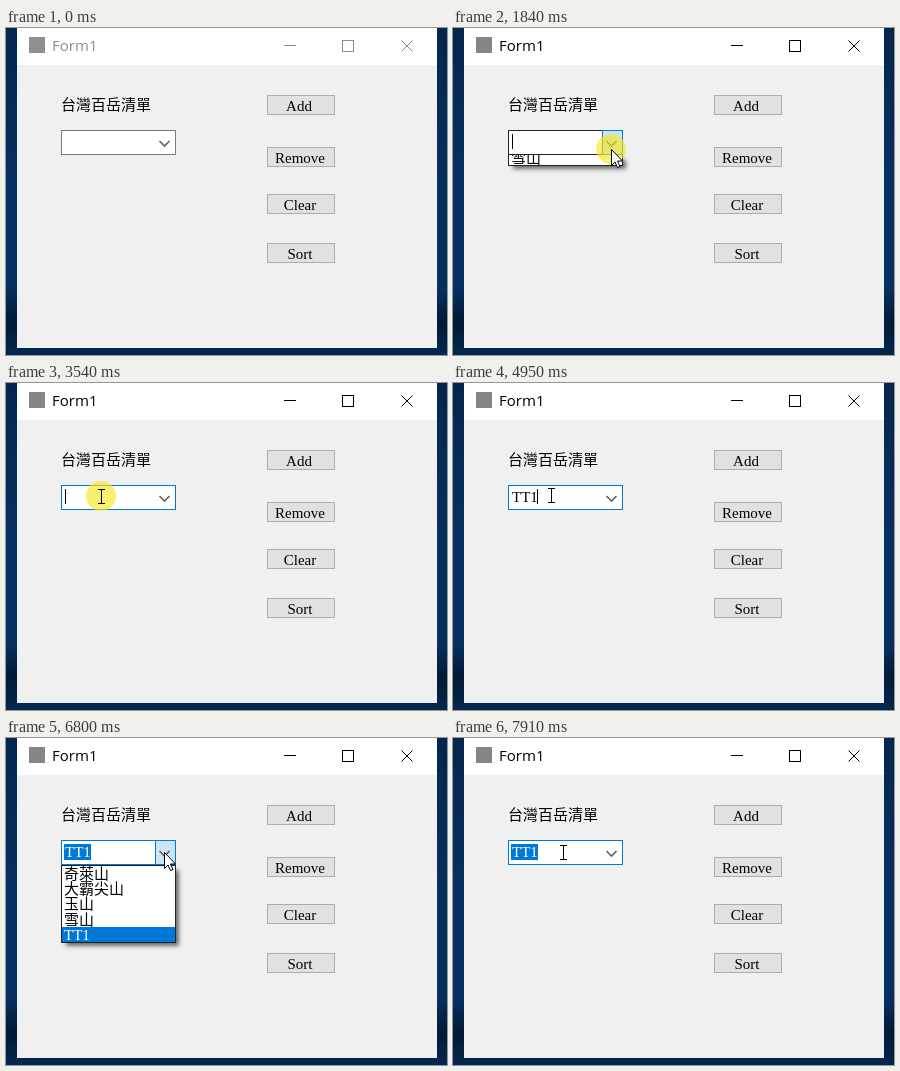
An HTML page with a canvas for the animation above (8 s loop, 441 by 327 pixels).

```html
<!DOCTYPE html>
<html lang="zh-Hant">
<head>
<meta charset="utf-8">
<title>Form1</title>
<style>
html, body { margin: 0; width: 100%; height: 100%; overflow: hidden; background: #04264c; }
canvas { display: block; }
</style>
</head>
<body>
<canvas id="stage" width="441" height="327"></canvas>
<script>
const ctx = document.getElementById('stage').getContext('2d');
const LOOP = 8000;
const BLUE = '#0078d7';
const SERIF = '15px "Liberation Serif", "Noto Sans CJK TC", "Noto Sans CJK", serif';
const CJK = '15px "Noto Sans CJK TC", "Noto Sans CJK", sans-serif';
const PEAKS = ['奇萊山', '大霸尖山', '玉山', '雪山'];
const ROW = 15.2, LIST_TOP = 127;
const COMBO = [55, 102, 115, 25];
const BUTTONS = [['Add', 67], ['Remove', 118.5], ['Clear', 166], ['Sort', 215]];

// Pointer path: time, x, y
const PATH = [
  [530, 260, 287], [1220, 134, 100], [1360, 134, 100], [1700, 158, 121],
  [2400, 158, 121], [2590, 169, 115], [2830, 247, 90], [3140, 157, 128],
  [3500, 95, 113], [3680, 98, 112], [4950, 98, 112], [5500, 285, 75],
  [5700, 284, 72], [6100, 284, 72], [6500, 158, 114], [6900, 158, 114],
  [7230, 125, 222], [7340, 125, 222], [7640, 116, 113], [7780, 116, 113],
  [7900, 110, 114]
];
const CLICKS = [[1290, 1430], [1700, 1910], [2380, 2450], [3540, 3680],
  [5560, 5700], [6570, 6710], [7230, 7330], [7640, 7850]];

const within = (t, a, b) => t >= a && t < b;
const clamp = v => Math.max(0, Math.min(1, v));
const inside = (p, x, y, w, h) => within(p.x, x, x + w) && within(p.y, y, y + h);

function pointerAt(t) {
  const i = PATH.findIndex(k => k[0] > t);
  if (i < 0) { const [, x, y] = PATH[PATH.length - 1]; return { x, y }; }
  const [t0, x0, y0] = PATH[Math.max(0, i - 1)], [t1, x1, y1] = PATH[i];
  const u = clamp((t - t0) / (t1 - t0)), e = u * u * (3 - 2 * u);
  return { x: Math.round(x0 + (x1 - x0) * e), y: Math.round(y0 + (y1 - y0) * e) };
}

function rect(x, y, w, h, fill) {
  ctx.fillStyle = fill;
  ctx.fillRect(x, y, w, h);
}

function box(x, y, w, h, fill, border) {
  rect(x, y, w, h, border);
  rect(x + 1, y + 1, w - 2, h - 2, fill);
}

function text(str, x, y, color = '#000', font = SERIF, align = 'left') {
  ctx.font = font;
  ctx.textAlign = align;
  ctx.fillStyle = color;
  ctx.fillText(str, x, y);
}

function line(color, width, ...points) {
  ctx.strokeStyle = color;
  ctx.lineWidth = width;
  ctx.beginPath();
  points.forEach(([x, y]) => ctx.lineTo(x, y));
  ctx.stroke();
}

function drawDesktop() {
  const g = ctx.createLinearGradient(0, 0, 0, 327);
  g.addColorStop(0, '#04264e');
  g.addColorStop(.45, '#06305f');
  g.addColorStop(.8, '#053060');
  g.addColorStop(.9, '#021a36');
  g.addColorStop(1, '#03284f');
  rect(0, 0, 441, 327, g);
}

function drawWindow(active) {
  const ink = active ? '#000' : '#8c8c8c';
  rect(11, 0, 420, 320, '#f0f0f0');
  rect(11, 0, 420, 37, '#fff');
  rect(23, 9, 16, 16, active ? '#858585' : '#8f8f8f');
  text('Form1', 46, 23, ink, '15px "Open Sans", sans-serif');
  line(ink, 1, [278, 17.5], [290, 17.5]);
  ctx.strokeRect(336.5, 12.5, 11, 11);
  line(ink, 1, [395.5, 12.5], [406.5, 23.5]);
  line(ink, 1, [406.5, 12.5], [395.5, 23.5]);
  text('台灣百岳清單', 55, 82, '#000', CJK);
}

function drawButtons(p, pressed) {
  for (const [label, top] of BUTTONS) {
    const area = [261, Math.round(top), 68, 20];
    const hot = inside(p, ...area);
    const [fill, border] = !hot ? ['#e1e1e1', '#adadad']
      : pressed ? ['#cce4f7', '#005499'] : ['#e5f1fb', BLUE];
    box(...area, fill, border);
    text(label, label === 'Add' ? 293 : 294, area[1] + 16, '#000', SERIF, 'center');
  }
}

function drawCombo(t, p, open) {
  const hover = inside(p, ...COMBO);
  const focused = within(t, 1430, 5700) || t >= 6570;
  const border = within(t, 1700, 1900) ? '#222' : focused || hover && t > 1360 ? BLUE : '#7a7a7a';
  box(...COMBO, '#fff', border);
  if (open || hover && p.x >= 149) box(149, 102, 21, 25, open ? '#cce4f7' : '#daecf8', BLUE);
  line('#606060', 1.6, [153.5, 113], [158.5, 118], [163.5, 113]);

  const value = t < 4010 ? '' : t < 4090 ? 'T' : t < 4490 ? 'TT' : 'TT1';
  const selected = t >= 6600;
  if (selected) rect(58, 106, 27, 16, BLUE);
  text(value, 59, 119, selected ? '#fff' : '#000');
  if (within(t, 1430, 2450) || within(t, 3540, 5650)) {
    rect(Math.round(59 + ctx.measureText(value).width) - (value ? 1 : 0), 106, 1, 15, '#000');
  }
}

function drawList(items, shown, selected) {
  const full = Math.round(items.length * ROW) + 2;
  const h = Math.round(full * shown);
  if (h < 2) return;
  ctx.save();
  ctx.shadowColor = 'rgba(0,0,0,.55)';
  ctx.shadowBlur = 4;
  ctx.shadowOffsetX = ctx.shadowOffsetY = 3;
  rect(57, LIST_TOP + 2, 113, h - 2, '#fff');
  ctx.restore();
  ctx.save();
  ctx.beginPath();
  ctx.rect(55, LIST_TOP, 115, h);
  ctx.clip();
  ctx.translate(0, h - full);
  box(55, LIST_TOP, 115, full, '#fff', '#222');
  items.forEach((name, i) => {
    const y = Math.round(LIST_TOP + 1 + i * ROW);
    if (i === selected) rect(56, y, 113, 15, BLUE);
    text(name, 58, y + 13, i === selected ? '#fff' : '#000', /T/.test(name) ? SERIF : CJK);
  });
  ctx.restore();
}

function drawPointer(p, clicking, beam) {
  ctx.save();
  ctx.translate(p.x, p.y);
  if (clicking) {
    ctx.fillStyle = 'rgba(246,230,30,.65)';
    ctx.beginPath();
    ctx.arc(0, 0, 15, 0, 7);
    ctx.fill();
  }
  if (beam) {
    rect(0, -7, 1, 15, '#000');
    for (const y of [-7, 7]) {
      rect(-3, y, 3, 1, '#000');
      rect(1, y, 3, 1, '#000');
    }
  } else {
    ctx.fillStyle = '#fff';
    ctx.strokeStyle = '#000';
    ctx.lineWidth = 1;
    ctx.stroke(ctx.fill(arrow) || arrow);
  }
  ctx.restore();
}
const arrow = new Path2D('M.5 .5V16.5L4 13L6.5 18.5L9 17.5L6.5 12H11.5Z');

function draw(t) {
  const p = pointerAt(t);
  const clicking = CLICKS.some(([a, b]) => within(t, a, b));
  const firstOpen = within(t, 1806, 2450), secondOpen = within(t, 6600, 7300);
  const open = firstOpen || secondOpen;

  drawDesktop();
  drawWindow(t >= 1360);
  drawButtons(p, clicking);
  drawCombo(t, p, open);
  if (firstOpen) drawList(PEAKS, clamp((t - 1806) / 200), -1);
  if (secondOpen) {
    const row = Math.floor((p.y - LIST_TOP - 1) / ROW);
    drawList([...PEAKS, 'TT1'], clamp((t - 6600) / 200), within(row, 0, 5) ? row : 4);
  }
  const typing = within(t, 4010, 4620);
  if (t >= 530 && !typing) {
    drawPointer(p, clicking, !open && inside(p, 56, 103, 93, 23));
  }
}

function tick() {
  draw(performance.now() % LOOP);
  requestAnimationFrame(tick);
}
tick();
</script>
</body>
</html>
```
